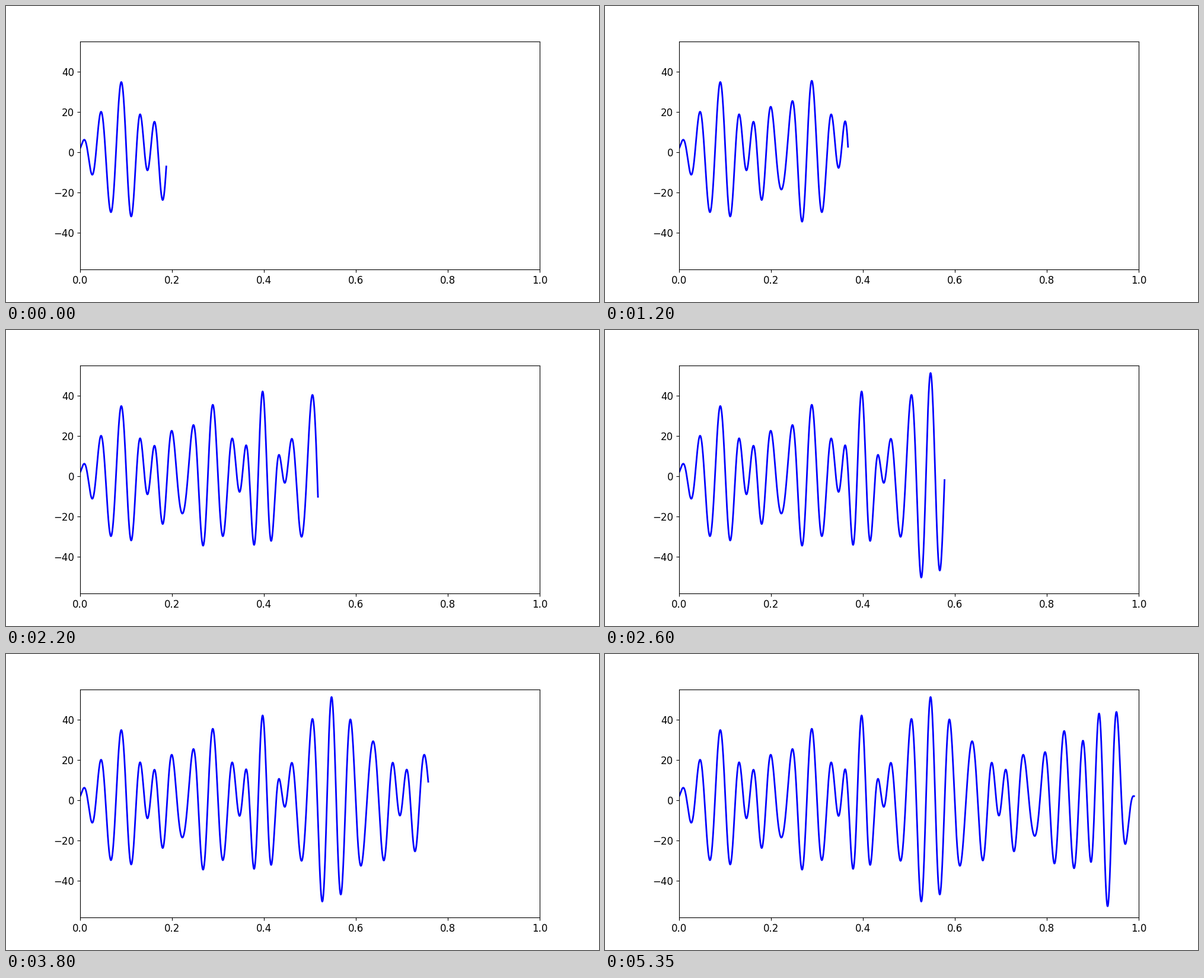
Write a matplotlib script that moves like this. It is 1000 px wide and 500 px high and loops after 5400 ms.

```python
import numpy as np
import matplotlib.pyplot as plt
from matplotlib.animation import FuncAnimation

FRAMES, INTERVAL = 108, 50
FIRST, STEP = 375, 15          # samples shown at the start, samples added per frame

plt.rcParams.update({"font.family": "DejaVu Sans", "font.size": 12})

# Band-limited signal: whole frequencies from 15 to 35 Hz
freq = np.arange(15, 36)
cos_amp = [-2.6, -1.9, -1.2, -1, -2.6, 11, -2.5, 6.2, -2.5, 14.2, 8.3,
           -4.8, -6, -2.4, -8, -2.2, 1.5, -1.7, 0, -1.4, 1.6]
sin_amp = [1.4, 4, -1.6, 3.1, 0.5, -8.2, 2.4, 3.3, -1.6, 4.8, -6.1,
           3.3, -8.4, 2.2, -3.1, 0, 3.9, -0.5, 3.5, 1.2, -0.7]


def wave(t):
    angle = 2 * np.pi * np.outer(t, freq)
    return np.cos(angle) @ cos_amp + np.sin(angle) @ sin_amp


x = np.linspace(0, 0.99, 1981)
y = wave(x)

fig, ax = plt.subplots(figsize=(10, 5), dpi=100)
fig.subplots_adjust(left=0.125, right=0.9, bottom=0.11, top=0.88)
ax.set_xlim(0, 1)
ax.set_ylim(-58.15, 55.1)
line, = ax.plot([], [], color="#0000ff", lw=2)


def draw(k):
    n = FIRST + STEP * k + 1
    line.set_data(x[:n], y[:n])
    return line,


anim = FuncAnimation(fig, draw, frames=FRAMES, interval=INTERVAL,
                     init_func=lambda: draw(0), repeat=True, repeat_delay=0)
plt.show()
```
